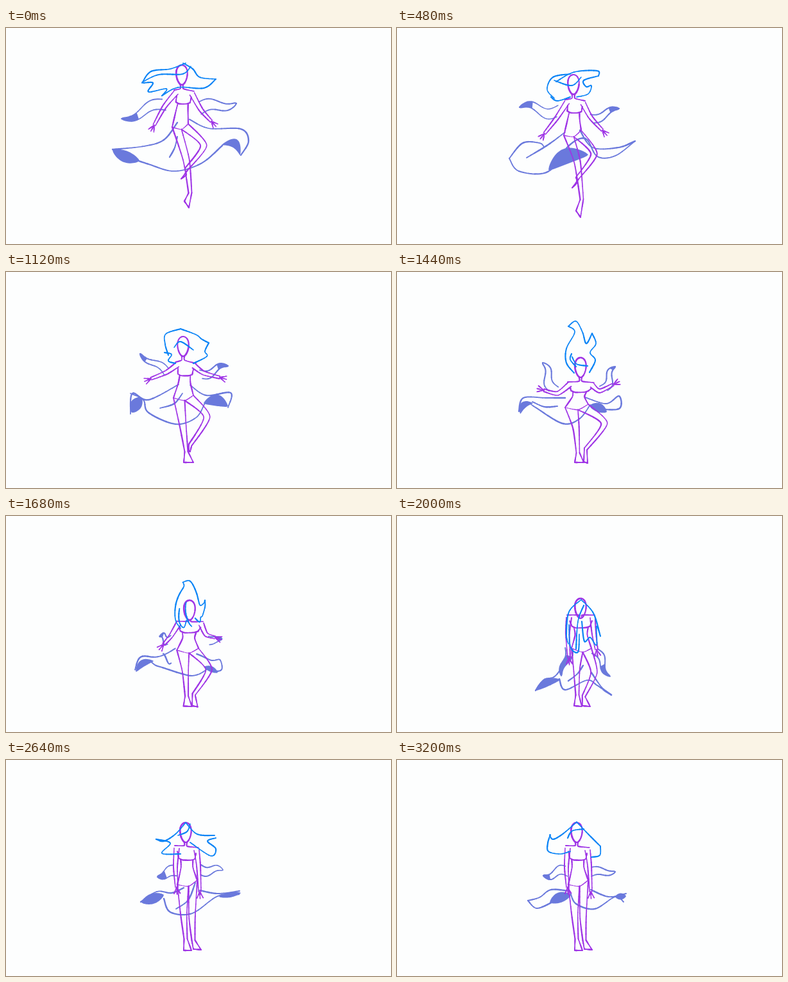
An HTML page with a canvas for the animation above (3.28 s loop, 600 by 338 pixels).

```html
<!DOCTYPE html>
<html lang="en">
<head>
<meta charset="utf-8">
<title>Floating dancer</title>
<style>
html, body { margin: 0; width: 100%; height: 100%; overflow: hidden; background: #fdfefe; }
canvas { display: block; width: 600px; height: 338px; }
</style>
</head>
<body>
<canvas id="stage" width="600" height="338"></canvas>
<script>
const ctx = document.getElementById('stage').getContext('2d');
const LOOP = 3280, STEP = 80, SAMPLES = 60;
const TIMES = [0, 480, 1120, 1440, 2000, 2640, 3200];
const POWER = [1, 1.6, 1, 1, 3.5, 1];   // ease-out strength between poses
const SKIN = '#9f35e6', HAIR = '#0b84f6', CLOTH = '#6a79dc';

const lerp = (a, b, u) => a.map((v, i) => v + (b[i] - v) * u);
const shift = (p, x, y) => [p[0] + x, p[1] + y];
const numbers = text => text.trim().split(/[\s,]+/).map(Number);
const pairs = text => text.trim().split(/\s+/).map(numbers);

// Unit normal of the line from a to b
function normal(a, b) {
  const x = b[0] - a[0], y = b[1] - a[1], len = Math.hypot(x, y) || 1;
  return [-y / len, x / len];
}

// Catmull-Rom curve resampled to evenly spaced points
function curve(p, tension = 0.5) {
  const dense = [], at = i => p[Math.max(0, Math.min(p.length - 1, i))];
  for (let i = 0; i < p.length - 1; i++) {
    const b = p[i], c = p[i + 1];
    for (let k = 0; k < 20; k++) {
      const u = k / 20, v = 1 - u;
      dense.push(b.map((y, j) => {
        const m = tension * (c[j] - at(i - 1)[j]), n = tension * (at(i + 2)[j] - y);
        return v * v * (1 + 2 * u) * y + u * u * (3 - 2 * u) * c[j] + u * v * (v * m - u * n);
      }));
    }
  }
  dense.push(p[p.length - 1]);
  const len = [0];
  for (let i = 1; i < dense.length; i++)
    len.push(len[i - 1] + Math.hypot(dense[i][0] - dense[i - 1][0], dense[i][1] - dense[i - 1][1]));
  let i = 1;
  return Array.from({ length: SAMPLES + 1 }, (_, k) => {
    const s = len[len.length - 1] * k / SAMPLES;
    while (i < len.length - 1 && len[i] < s) i++;
    return lerp(dense[i - 1], dense[i], (s - len[i - 1]) / (len[i] - len[i - 1] || 1));
  });
}

// Body: one place per pose for each joint; the last pose is held
const joints = {
  chin: '274,89 275,104 276,132 286,165 286,160 280,129',
  shoulderL: '265,101 265,116 267,145 269,176 268,159 266,138',
  shoulderR: '290,103 290,118 293,147 304,177 305,159 297,141',
  elbowL: '247,123 248,142 250,157 250,190 266,185 264,168',
  elbowR: '304,128 302,140 308,158 316,186 307,185 300,165',
  wristL: '231,152 230,165 226,167 229,185 268,222 266,199',
  wristR: '320,146 320,160 333,165 337,176 311,209 302,206',
  hipL: '259,155 260,168 261,197 262,212 272,207 267,195',
  hipR: '284,150 287,160 292,193 298,207 303,207 298,188',
  kneeL: '281,207 281,210 276,243 279,244 280,240 277,242',
  kneeR: '308,184 307,197 313,227 323,237 307,245 290,246',
  ankleL: '287,258 288,268 281,281 282,283 281,280 280,280',
  ankleR: '281,221 281,235 287,271 294,277 291,282 292,282',
  heelL: '278,271 279,286 277,298 277,298 276,297 277,298',
  heelR: '281,230 281,242 285,280 291,297 289,297 292,296',
  toeL: '285,281 286,296 292,298 291,298 288,298 289,298',
  toeR: '273,236 273,250 287,281 297,299 301,298 304,297'
};
for (const name in joints) joints[name] = pairs(joints[name]);

// Cloth and hair lines: a few key points per pose
const lines = [];
function line(ink, width, text) {
  lines.push({ ink, width, poses: text.split('|').map(s => curve(pairs(s))) });
}
const skirt = text => line(CLOTH, 2.1, text);
const hair = text => line(HAIR, 1.9, text);

skirt(`166,190 215,185 246,175 267,148|175,204 196,180 222,180 229,186|194,222 197,190 222,200 269,176
|190,218 197,197 232,197 262,197|216,273 229,256 247,250 266,222|210,222 235,206 258,208 277,200|204,220 222,215 240,203 268,205`);
skirt(`190,202 222,213 262,224 304,212 337,184|175,204 190,224 235,225 268,184 294,173 312,201 340,200 371,177
|194,190 214,200 222,220 264,238 296,228 310,205|193,214 202,203 216,212 258,237 284,230 301,208
|253,255 262,272 296,257 312,265 334,280|246,217 256,238 290,240 330,213 363,210|270,207 279,225 308,233 340,214 353,222`);
skirt(`286,143 316,157 366,158 378,177 366,199|285,160 305,187 345,187 371,177|287,177 312,193 350,189 346,212
|293,196 326,206 346,194 346,214 308,214|303,245 319,268 334,280|302,204 330,209 364,205|302,203 330,214 357,209`);
skirt(`267,170 263,187 255,202|262,163 235,183 202,203|275,190 262,206 240,213|211,203 230,211 250,210
|290,234 281,247 267,258|295,192 284,219 265,233|204,220 218,232 243,222`);

hair(`280,55 256,64 226,68 212,86|270,72 243,77 234,96 245,110|272,89 249,97 248,113 253,130
|267,85 277,94 264,120 264,142 276,158|287,131 268,150 264,185 267,200|280,98 264,116 246,127 234,124|280,97 258,116 243,124 238,117`);
hair(`214,86 229,86 222,100 250,95 243,106|240,108 250,114 270,108|247,126 258,129 253,139 264,143|272,128 270,137 279,148
|268,170 270,204 282,213 284,185|234,124 256,130 243,146 272,147|239,117 235,130 236,143 254,147 270,143`);
hair(`276,55 291,64 302,77 327,80|248,84 276,69 312,67 314,75|272,89 296,98 305,105 316,111
|267,85 279,77 289,94 295,112 304,96|287,131 306,152 317,188|280,98 298,116 325,118|280,97 300,118 317,135`);
hair(`327,80 308,94 268,93 243,106|314,75 291,82 295,92 303,90 298,103 280,108|316,111 310,124 313,132 292,143
|304,96 310,112 301,126 309,138 300,157|317,188 311,172 311,202 301,190 292,196 288,165
|327,122 314,127 327,139 319,150 287,129|317,135 316,149 303,152`);
hair(`288,60 275,72 238,73 212,85|287,77 272,90 245,82|262,118 272,109 292,122|273,133 280,144 297,147
|291,140 282,165 279,208|287,100 282,112 268,118|291,108 273,111 266,122`);

// Turned-over skirt folds: start, end, bend, half width
const folds = [
  `166,191 208,208 2 9|236,222 298,198 -10 12|196,220 211,196 -1 9|192,222 212,205 -7 5
  |216,273 254,256 -4 6|211,223 246,211 0 8|238,223 271,211 -2 8`,
  `336,183 365,199 -12 7|355,184 371,177 0 1|308,205 346,210 -7 9|300,209 327,219 -2 7
  |320,272 334,280 0 1|332,214 366,208 0 4|340,214 357,213 0 5`
].map(s => s.split('|').map(numbers));

// Sleeve ribbons: tip, root, half width, wave height, shaded share
const ribbons = [
  `180,142 246,120 9 5 .4|191,124 250,130 9 -6 .35|209,128 250,156 6 3 .3|227,142 244,183 8 -4 0
  |256,250 268,208 6 -3 .8|236,183 263,173 9 2 .5|228,181 264,174 8 4 .3`,
  `359,118 303,125 10 -4 0|346,126 304,142 7 3 .35|346,147 304,160 7 4 .4|340,148 322,182 7 4 .2
  |332,251 309,212 6 -4 .5|338,172 304,172 8 3 0|340,175 303,175 7 -2 0`
].map(s => s.split('|').map(numbers));

// Brush pressure varies along the line
function stroke(pts, ink, width) {
  const chunk = 6;
  ctx.strokeStyle = ink;
  for (let k = 0; k < pts.length - 1; k += chunk) {
    ctx.lineWidth = width * (1 + 0.18 * Math.sin(k / 9 + pts[0][0]));
    ctx.beginPath();
    pts.slice(k, k + chunk + 1).forEach(p => ctx.lineTo(...p));
    ctx.stroke();
  }
}

function fill(pts) {
  ctx.fillStyle = CLOTH;
  ctx.beginPath();
  pts.forEach(p => ctx.lineTo(...p));
  ctx.fill();
}

// Two edges at a changing distance from an axis
function edges(axis, across, radius) {
  const side = sign => axis.map((p, k) => {
    const r = sign * radius(k / (axis.length - 1));
    return shift(p, across[0] * r, across[1] * r);
  });
  return [side(1), side(-1)];
}

function drawFold([ax, ay, bx, by, bend, width]) {
  const n = normal([ax, ay], [bx, by]);
  const axis = Array.from({ length: 25 }, (_, k) => {
    const s = k / 24, off = 4 * s * (1 - s) * bend;
    return shift(lerp([ax, ay], [bx, by], s), n[0] * off, n[1] * off);
  });
  const [up, down] = edges(axis, n, s => width * Math.pow(Math.sin(Math.PI * s), 0.7) || 0);
  fill([...up, ...down.reverse()]);
}

function drawRibbon([ax, ay, bx, by, width, wave, shade]) {
  const n = normal([ax, ay], [bx, by]);
  const axis = Array.from({ length: 31 }, (_, k) => {
    const s = k / 30, off = wave * Math.sin(2 * Math.PI * s);
    return shift(lerp([ax, ay], [bx, by], s), n[0] * off, n[1] * off);
  });
  const [up, down] = edges(axis, n, s => width * Math.sqrt(s));
  stroke(up, CLOTH, 1.8);
  stroke(down, CLOTH, 1.8);
  const end = Math.round(30 * shade);
  if (end) fill([...up.slice(0, end), ...down.slice(0, end).reverse()]);
}

const ink = (pts, width = 1.8) => stroke(curve(pts, 0.36), SKIN, width);

// Points beside the middle and end joints of a limb
function beside(a, b, c, side, mid, end) {
  const n = normal(a, c), m = normal(b, c);
  return [shift(b, n[0] * side * mid, n[1] * side * mid), shift(c, m[0] * side * end, m[1] * side * end)];
}

function drawArm(a, b, c) {
  const n = normal(a, b);
  for (const side of [-1, 1])
    ink([shift(a, n[0] * side * 4, n[1] * side * 4), ...beside(a, b, c, side, 3, 2)]);
  const aim = Math.atan2(c[1] - b[1], c[0] - b[0]);
  for (const spread of [-0.45, 0, 0.45]) {
    const tip = r => shift(c, r * Math.cos(aim + spread), r * Math.sin(aim + spread));
    ink([c, tip(6), tip(11)], 1.6);
  }
}

function drawLeg(left, right, knee, ankle, heel, toe) {
  const top = lerp(left, right, 0.5);
  const l = beside(top, knee, ankle, 1, 4.8, 2.5), r = beside(top, knee, ankle, -1, 4.8, 2.5);
  ink([left, ...l], 2);
  ink([right, ...r]);
  ink([l[1], heel]);
  ink([heel, toe], 2);
  ink([toe, r[1]]);
}

function drawBody(j) {
  const chest = lerp(j.shoulderL, j.shoulderR, 0.5), hips = lerp(j.hipL, j.hipR, 0.5);
  const waist = lerp(chest, hips, 0.57), crotch = shift(hips, 2, 6);
  const sides = [[j.shoulderL, j.hipL, -1], [j.shoulderR, j.hipR, 1]];
  const busts = sides.map(([shoulder, hip, side]) => {
    const w = shift(waist, side * 9.5, 0), bust = lerp(shoulder, w, 0.5), top = shift(shoulder, side * 3, -4);
    const nape = shift(j.chin, side * 2.5, 6);
    nape[1] = Math.min(nape[1], top[1]);
    ink([shift(j.chin, side * 2.5, -1), nape, top]);
    ink([shift(shoulder, -side, 5), bust]);
    ink([shift(bust, -side * 3, 2), w, hip], 2);
    return bust;
  });
  ink([busts[0], shift(lerp(...busts, 0.25), 0, 2.5), shift(lerp(...busts, 0.75), 0, 2), busts[1]], 2);
  ink([j.hipL, crotch, j.hipR], 1.2);

  drawLeg(j.hipL, crotch, j.kneeL, j.ankleL, j.heelL, j.toeL);
  drawLeg(crotch, j.hipR, j.kneeR, j.ankleR, j.heelR, j.toeR);
  drawArm(j.shoulderL, j.elbowL, j.wristL);
  drawArm(j.shoulderR, j.elbowR, j.wristR);

  // Egg-shaped head, narrow at the chin
  const head = Array.from({ length: 43 }, (_, k) => {
    const a = k / 42 * 2 * Math.PI;
    return shift(j.chin, Math.cos(a) * (8.6 - 1.6 * Math.sin(a)), 15.5 * (Math.sin(a) - 1));
  });
  stroke(head, SKIN, 2.4);
}

function draw(t) {
  ctx.fillStyle = '#fdfefe';
  ctx.fillRect(0, 0, 600, 338);
  ctx.lineCap = ctx.lineJoin = 'round';
  let i = 0;
  while (i < TIMES.length - 2 && t >= TIMES[i + 1]) i++;
  const raw = (t - TIMES[i]) / (TIMES[i + 1] - TIMES[i]);
  const u = 1 - Math.pow(1 - raw, POWER[i]);
  const mix = poses => lerp(poses[i], poses[i + 1] || poses[i], u);
  const sway = 2.5 * Math.sin(Math.PI * u);
  const drawLines = color => lines.filter(l => l.ink === color).forEach(l => {
    const pts = l.poses[i].map((p, k) =>
      shift(lerp(p, l.poses[i + 1][k], u), 0, sway * Math.sin(k / 10 - t / 110)));
    stroke(pts, color, l.width);
  });

  drawLines(CLOTH);
  folds.forEach(f => drawFold(mix(f)));
  ribbons.forEach(r => drawRibbon(mix(r)));
  drawBody(Object.fromEntries(Object.entries(joints).map(([name, track]) => [name, mix(track)])));
  drawLines(HAIR);
}

const start = performance.now();
function tick() {
  const t = (performance.now() - start) % LOOP;
  draw(Math.floor(t / STEP) * STEP);
  requestAnimationFrame(tick);
}
tick();
</script>
</body>
</html>
```
